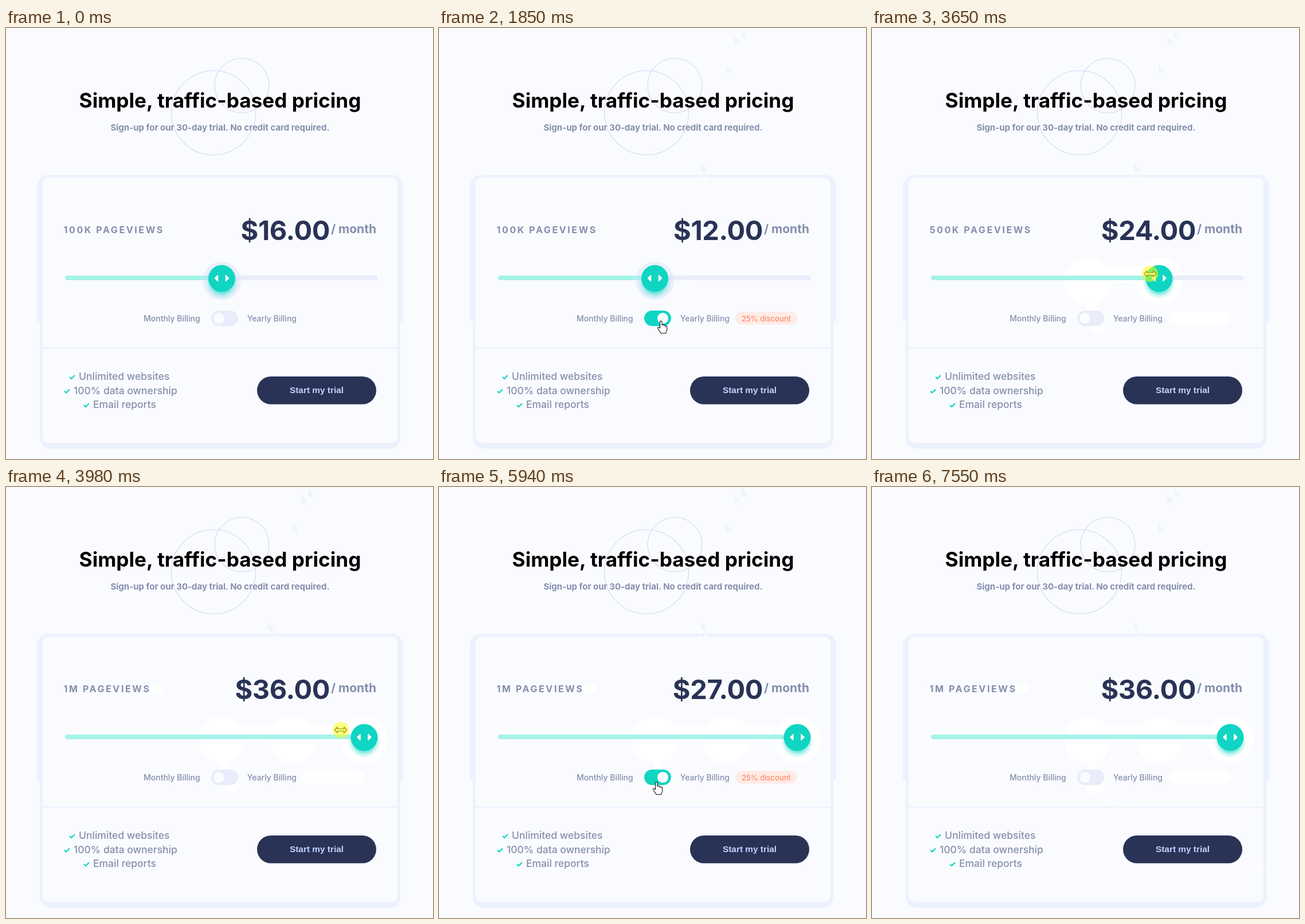
Recreate the animation shown at these times as an HTML page. Size 745 by 752 pixels, loop 8450 ms.

```html
<!DOCTYPE html>
<html lang="en">
<head>
<meta charset="utf-8">
<title>Pricing card</title>
<style>
  html, body { margin: 0; width: 100%; height: 100%; overflow: hidden; background: #fafbff; }
  svg { display: block; }
  text { font-family: Inter, sans-serif; font-weight: 500; fill: #858fad; white-space: pre; }
  .bold { font-weight: 700; }
  .check { fill: none; stroke: #10d5c2; stroke-width: 2.2; }
</style>
</head>
<body>
<svg width="745" height="752" viewBox="0 0 745 752">
  <defs>
    <radialGradient id="glow">
      <stop offset=".6" stop-color="#10d8c4" stop-opacity=".6"/>
      <stop offset=".82" stop-color="#10d8c4" stop-opacity=".18"/>
      <stop offset="1" stop-color="#10d8c4" stop-opacity="0"/>
    </radialGradient>
    <path id="arrow" d="M0 0V16l4-3.5 2.6 6 2.5-1-2.6-5.7H12z"/>
    <path id="hand" d="M-1.5 1.5c0-2 3.5-2 3.5 0v6c0-1.6 3-1.6 3.2 0v1c.3-1.4 3-1.2 3 .3v1c.4-1.2 2.6-1 2.6.6V15c0 3-2 4-2 6.5H0c0-2-5-6-5.5-9 0-2 2.5-2 4 .5z"/>
    <path id="resize" d="M-10.5 0l5-5v3h11v-3l5 5-5 5v-3h-11v3z"/>
  </defs>

  <g fill="none" stroke="#d0d9f1" stroke-width="1.1">
    <circle cx="411.5" cy="100.5" r="47.5"/>
    <circle cx="362" cy="148" r="73.5"/>
  </g>

  <path d="M54 512V276a20 20 0 0 1 20-20H673a20 20 0 0 1 20 20V512H688V716a18 18 0 0 1-18 18H77a18 18 0 0 1-18-18V512z" fill="#ecf2fd"/>
  <rect x="64" y="261" width="619" height="463" rx="10" fill="#fafbff"/>
  <rect x="64" y="557.5" width="619" height="2" fill="#e9effc"/>

  <g id="ghosts"></g>
  <g id="discs" fill="#fff">
    <circle cx="376.5" cy="441" r="41"/>
    <circle cx="501" cy="441" r="41"/>
    <circle cx="625" cy="441" r="41"/>
  </g>
  <path id="band" fill="none" stroke="#fff" stroke-width="28"/>
  <path id="drip" d="M381 470V490M388 522l8 4" stroke="#fff" stroke-width="12" stroke-linecap="round"/>
  <rect id="wordGhost" x="250" y="345" width="24" height="13" rx="5" fill="#fff"/>

  <text class="bold" x="373.5" y="139" font-size="35.2" text-anchor="middle" style="fill:#000">Simple, traffic-based pricing</text>
  <text class="bold" x="373.5" y="179" font-size="15" text-anchor="middle">Sign-up for our 30-day trial. No credit card required.</text>

  <text id="views" class="bold" x="100.5" y="357.5" font-size="16" letter-spacing="2.6"></text>
  <text id="price" class="bold" x="565" y="369.5" font-size="47" letter-spacing="-.4" text-anchor="end" style="fill:#293356"></text>
  <text class="bold" x="646" y="358" font-size="21" text-anchor="end">/ month</text>

  <rect x="103" y="432" width="545.5" height="8" rx="4" fill="#e9edfa"/>
  <rect id="filled" x="103" y="432" height="8" rx="4" fill="#a4f3e9"/>
  <g id="knob">
    <circle id="halo" cy="441" r="33.5" fill="#cfdff7" opacity=".4"/>
    <circle cy="444" r="29" fill="url(#glow)"/>
    <circle cy="437" r="23.5" fill="#10d5c2"/>
    <path d="M-7 431.5V441.5L-12 436.5zM7 431.5V441.5L12 436.5z" fill="#fff" stroke="#fff" stroke-width="1.5" stroke-linejoin="round"/>
  </g>

  <text x="240" y="511.5" font-size="14">Monthly Billing</text>
  <text x="507" y="511.5" font-size="14" text-anchor="end">Yearly Billing</text>
  <rect id="toggle" x="358" y="493" width="47" height="27" rx="13.5"/>
  <circle id="dot" cy="506.5" r="9.5" fill="#fbfcff"/>
  <rect id="pill" x="517" y="495" width="108" height="22.5" rx="11.2"/>
  <text id="discount" x="571" y="511.5" font-size="13" text-anchor="middle" style="fill:#ff8b69">25% discount</text>

  <g font-size="17.5">
    <text x="127" y="614">Unlimited websites</text>
    <text x="118" y="638.5">100% data ownership</text>
    <text x="152" y="663">Email reports</text>
  </g>
  <path class="check" d="M111 609l3 3 6-6M102 633.5l3 3 6-6M136 658l3 3 6-6"/>

  <rect x="438" y="608" width="208" height="48.5" rx="24.25" fill="#293356"/>
  <text id="label" x="542" y="637" font-size="15.4" text-anchor="middle" style="font-family:'Liberation Sans',Arial,sans-serif;font-weight:700">Start my trial</text>

  <use id="cursor" fill="#fff" stroke="#111" stroke-width="1.1" stroke-linejoin="round"/>
  <circle id="press" r="14" fill="#ff0" opacity="0"/>
</svg>
<script>
const LOOP = 8450;
const ENTER = 160, LEAVE = 7550;
const DRAG = [3090, 3980];
const JUMPS = [3510, 3957];
const PRESSES = [[1370, 1500], [2390, 2520], DRAG, [4720, 4870], [5940, 6060]];
const TOGGLES = [1500, 2520, 4870, 6060];
const KNOBS = [376.5, 501, 625];
const PLANS = [['100K', 16], ['500K', 24], ['1M', 36]];

// time, x, y of the pointer tip
const ROUTE = [
  [160, 527, 2], [190, 515, 14], [220, 500, 64], [290, 478, 150], [370, 457, 236],
  [500, 451, 290], [700, 442, 370], [850, 428, 440], [950, 410, 485], [1000, 396, 505],
  [1030, 394, 505], [1170, 391, 511], [1370, 391, 511], [1400, 387, 511],
  [2620, 387, 511], [2900, 382, 470], [3080, 390, 435], [3250, 390, 435],
  [3650, 485, 429], [3980, 584, 424], [4180, 584, 424], [4520, 384, 500],
  [4870, 384, 500], [5200, 379, 513], [5370, 379, 513], [5400, 379, 515],
  [6150, 379, 515], [6700, 545, 642], [6900, 545, 642], [7050, 560, 652], [7550, 692, 652]
];

const el = {};
document.querySelectorAll('[id]').forEach(node => el[node.id] = node);
const set = (node, attrs) => {
  for (const key in attrs) node.setAttribute(key, attrs[key]);
};
const show = (node, on) => set(node, { visibility: on ? 'visible' : 'hidden' });
const clamp = v => Math.max(0, Math.min(1, v));
const between = (v, low, high) => v >= low && v <= high;
const inside = (x, y, l, t, r, b) => between(x, l, r) && between(y, t, b);
const passed = (times, t) => times.filter(time => t >= time).length;

function pointer(t) {
  const i = Math.max(1, ROUTE.findIndex(p => p[0] >= t));
  const [t0, x0, y0] = ROUTE[i - 1], [t1, x1, y1] = ROUTE[i];
  const k = clamp((t - t0) / (t1 - t0));
  return [x0 + (x1 - x0) * k, y0 + (y1 - y0) * k];
}

const overButton = (x, y) => inside(x, y, 438, 608, 646, 657);

function shape(t, x, y) {
  const knob = KNOBS[passed(JUMPS, t)];
  if (between(t, DRAG[0], 4180) || Math.hypot(x - knob, y - 437) < 24) return '#resize';
  return overButton(x, y) || inside(x, y, 358, 490, 405, 521) ? '#hand' : '#arrow';
}

// Faint marks the pointer leaves behind
const ghosts = [];
let last = [0, 0];
for (let t = ENTER; t < LEAVE; t += 30) {
  const [x, y] = pointer(t);
  const moved = Math.hypot(x - last[0], y - last[1]) > 1;
  last = [x, y];
  if (!moved || between(t, 3080, 4180) || between(y, 80, 230)) continue;
  const node = document.createElementNS('http://www.w3.org/2000/svg', 'use');
  const early = y < 240;
  set(node, {
    href: shape(t, x, y), x, y,
    fill: early ? '#f0f4fe' : 'none',
    stroke: early ? 'none' : '#fff'
  });
  el.ghosts.append(node);
  ghosts.push([t, node]);
}

function draw(t) {
  const plan = passed(JUMPS, t);
  const flips = passed(TOGGLES, t);
  const on = flips % 2 === 1;
  const slide = flips ? clamp((t - TOGGLES[flips - 1]) / 200) : 1;
  const side = on ? slide : 1 - slide;
  const [views, cost] = PLANS[plan];
  const [x, y] = pointer(Math.min(t, LEAVE));
  const present = t >= ENTER && t < LEAVE;

  el.views.textContent = views + ' PAGEVIEWS';
  el.price.textContent = '$' + (cost * (on ? 0.75 : 1)).toFixed(2);
  show(el.wordGhost, plan === 2);

  set(el.knob, { transform: `translate(${KNOBS[plan]} 0)` });
  set(el.filled, { width: KNOBS[plan] - 103 });
  show(el.halo, plan === 0);
  [...el.discs.children].forEach((disc, i) => show(disc, plan > 0 && i <= plan));
  const bandEnd = pointer(Math.max(3250, Math.min(t, DRAG[1])))[0];
  set(el.band, { d: `M390 430H${bandEnd}` });
  show(el.band, t > 3250);
  show(el.drip, t > 3000);

  set(el.toggle, { fill: on ? '#10d5c2' : '#e9ecfa' });
  set(el.dot, { cx: 371.5 + 19 * side });
  set(el.pill, { fill: on ? '#ffebe6' : '#fff' });
  show(el.pill, flips > 0);
  show(el.discount, on);

  el.label.style.fill = present && overButton(x, y) ? '#fff' : '#c0d5ff';
  set(el.cursor, { href: shape(t, x, y), x, y });
  show(el.cursor, present);
  const strength = Math.max(...PRESSES.map(([down, up]) =>
    t < down ? 0 : Math.min(clamp((t - down) / 50), 1 - clamp((t - up) / 120))));
  set(el.press, { cx: x, cy: y, opacity: 0.52 * strength });

  for (const [time, node] of ghosts) show(node, t > time + 60);
}

const start = performance.now();
function tick() {
  draw((performance.now() - start) % LOOP);
  requestAnimationFrame(tick);
}
tick();
</script>
</body>
</html>
```
